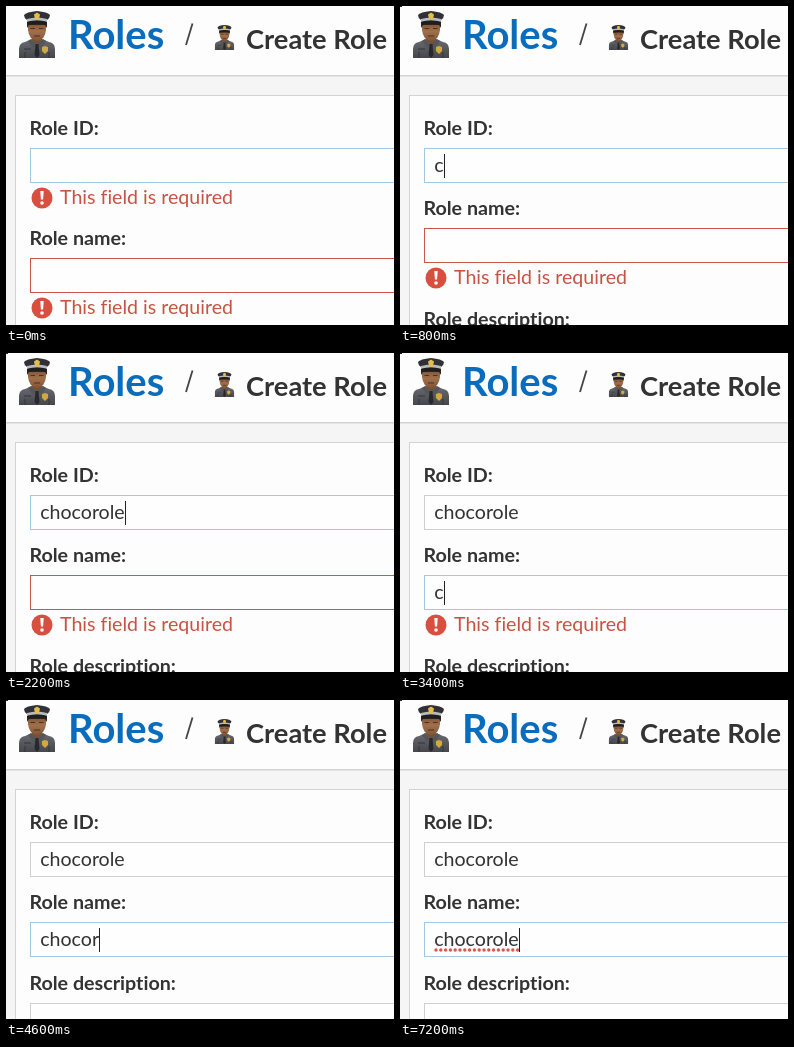
These frames come from a looping animation (388 px wide and 319 px high, 7.4 s). An HTML page:

```html
<!DOCTYPE html>
<html lang="en">
<head>
<meta charset="utf-8">
<title>Create Role</title>
<style>
  html, body { margin: 0; width: 100%; height: 100%; overflow: hidden; background: #fdfdfd; }
  svg { display: block; }
  text {
    font-family: Lato, "Open Sans", sans-serif;
    font-variant-ligatures: none;
    fill: #333;
    white-space: pre;
  }
  .label, .heading { font-weight: 700; }
  .label { font-size: 19.7px; }
  .value { font-size: 19.6px; }
  .error text { font-size: 19.6px; fill: #c65444; }
  .box { fill: #fefefe; stroke: #cfcfcf; }
  .box.invalid { stroke: #c9584a; }
  .box.focus { stroke: #a2c8e4; }
  .caret { fill: #222; }
  .spelling { fill: none; stroke: #e2544a; stroke-width: 3.4; stroke-linecap: round; stroke-dasharray: 0 4.8; }
</style>
</head>
<body>
<svg id="stage" width="388" height="319" viewBox="0 0 388 319">
  <defs>
    <linearGradient id="coat" x2="0" y2="1">
      <stop stop-color="#6a6b70"/><stop offset="1" stop-color="#46474c"/>
    </linearGradient>
    <linearGradient id="skin" x2="0" y2="1">
      <stop stop-color="#7c5133"/><stop offset=".5" stop-color="#a0704b"/><stop offset="1" stop-color="#805437"/>
    </linearGradient>
    <symbol id="officer" viewBox="0 0 38 47">
      <path d="M1 47V38Q1 32 7 31L14 28H24L31 31Q37 32 37 38V47Z" fill="url(#coat)"/>
      <path d="M14 24H24V29L19 34L14 29Z" fill="#79502f"/>
      <path d="M13 28L19 34L15 37L10 30ZM25 28L19 34L23 37L28 30Z" fill="#55565b"/>
      <path d="M17.5 33H20.5L21.5 44L19 47L16.5 44Z" fill="#29292d"/>
      <path d="M6 38H13M7 47V41M31 47V41" stroke="#343539"/>
      <path d="M24 36L27 35L30 36V40L27 43L24 40Z" fill="#d3a83f"/>
      <path d="M10 11H28V19Q27 29 19 30Q11 29 10 19Z" fill="url(#skin)"/>
      <path d="M9 10H29V17L27 14H11L9 17Z" fill="#33261e"/>
      <path d="M12.5 17.5H17M21 17.5H25.5M16 25H22" stroke="#4d3120" stroke-width="1.2"/>
      <path d="M6 4Q8 1 19 0Q30 1 32 4Q32 7 29 9H9Q6 7 6 4Z" fill="#303136"/>
      <path d="M9 8Q19 5 29 8V11Q19 8 9 11Z" fill="#b9babd"/>
      <path d="M9 11Q19 7.5 29 11L28 14Q19 12 10 14Z" fill="#1d1e21"/>
      <path d="M19 1.5L22 3.5L21 8L19 9L17 8L16 3.5Z" fill="#e5bd4c"/>
    </symbol>
  </defs>

  <rect width="388" height="319" fill="#f5f5f6"/>
  <rect width="388" height="69" fill="#fdfdfd"/>
  <rect y="69" width="388" height="1.5" fill="#d2d3d5"/>
  <use href="#officer" x="12" y="5" width="38" height="47"/>
  <text class="heading" x="62" y="42.5" font-size="40" style="fill:#0a6cbd">Roles</text>
  <path d="M180 39L186.5 17.5" stroke="#444" stroke-width="1.8"/>
  <use href="#officer" x="208" y="19" width="21" height="25"/>
  <text class="heading" x="240" y="42.5" font-size="27.3">Create Role</text>
  <rect x="9.5" y="89.5" width="400" height="250" fill="#fdfdfd" stroke="#d3d3d5"/>
  <g id="form"></g>
  <rect id="corner" width="2" height="1" fill="#222"/>
</svg>
<script>
const LOOP = 7400;
const TICK = 200;
const WORD = "chocorole";
const TEXT_X = 34.2;
const ERROR_HEIGHT = 30;
const SLIDE_TIME = 400;
const TYPING_TIME = 1800;
const SPELLING_DELAY = 1000;

const form = document.getElementById("form");
const corner = document.getElementById("corner");

const clamp = value => Math.min(1, Math.max(0, value));
const show = (element, visible) =>
  element.setAttribute("visibility", visible ? "visible" : "hidden");

function createField(label, options) {
  const group = document.createElementNS("http://www.w3.org/2000/svg", "g");
  group.innerHTML = `
    <text class="label" x="23.4" y="128.5">${label}:</text>
    <rect class="box" x="24.5" y="142.5" width="400" height="34"/>
    <path class="spelling" d="M36 170H119"/>
    <text class="value" x="${TEXT_X}" y="166"></text>
    <rect class="caret" y="148" width="1" height="24"/>
    <svg class="error" y="177" width="388" overflow="hidden">
      <circle cx="36" cy="15" r="10.5" fill="#d94f3f"/>
      <path d="M34.3 8H37.7L37.1 16.5H34.9Z" fill="#fff"/>
      <circle cx="36" cy="20" r="1.8" fill="#fff"/>
      <text x="54" y="21">This field is required</text>
    </svg>`;
  form.append(group);
  const part = name => group.querySelector("." + name);
  return { group, box: part("box"), spelling: part("spelling"), value: part("value"),
           caret: part("caret"), error: part("error"), ...options };
}

const fields = [
  createField("Role ID", { focusAt: 200, typeAt: 400, required: true }),
  createField("Role name", { focusAt: 2600, typeAt: 3400, required: true }),
  createField("Role description", { focusAt: Infinity, typeAt: Infinity })
];

// The first letter waits for the error to slide away, then the rest follow evenly.
function lettersTyped(elapsed) {
  if (elapsed < 0) return 0;
  const progress = clamp((elapsed - SLIDE_TIME) / (TYPING_TIME - SLIDE_TIME));
  return Math.round(1 + progress * (WORD.length - 1));
}

// Off after 300 ms without input, then toggling every 480 ms.
const caretLit = idle => Math.floor((idle + 180) / 480) % 2 === 0;

function drawField(field, time, focused, y) {
  const elapsed = time - field.typeAt;
  const idle = elapsed < 0 ? time - field.focusAt : elapsed - TYPING_TIME;
  const typing = elapsed >= 0 && idle < 0;
  const errorHeight = field.required ? ERROR_HEIGHT * (1 - clamp(elapsed / SLIDE_TIME)) : 0;

  field.group.setAttribute("transform", `translate(0 ${y})`);
  field.box.classList.toggle("focus", focused);
  field.box.classList.toggle("invalid", errorHeight > 0);
  field.value.textContent = WORD.slice(0, lettersTyped(elapsed));
  const width = field.value.textContent ? field.value.getComputedTextLength() : 0;
  field.caret.setAttribute("x", Math.ceil(TEXT_X + width - 0.2));
  show(field.caret, focused && (typing || caretLit(idle)));
  show(field.spelling, focused && elapsed >= TYPING_TIME + SPELLING_DELAY);
  field.error.setAttribute("height", errorHeight);
  show(field.error, errorHeight > 0);
  return errorHeight;
}

function draw(time) {
  const active = time < fields[1].focusAt ? 0 : 1;
  let y = 0;
  fields.forEach((field, i) => {
    y += 80.4 + drawField(field, time, i === active, Math.round(y));
  });
  show(corner, time >= TICK);
}

const origin = performance.now();
function tick() {
  const time = (performance.now() - origin) % LOOP;
  draw(Math.floor(time / TICK) * TICK);
  requestAnimationFrame(tick);
}
tick();
</script>
</body>
</html>
```
